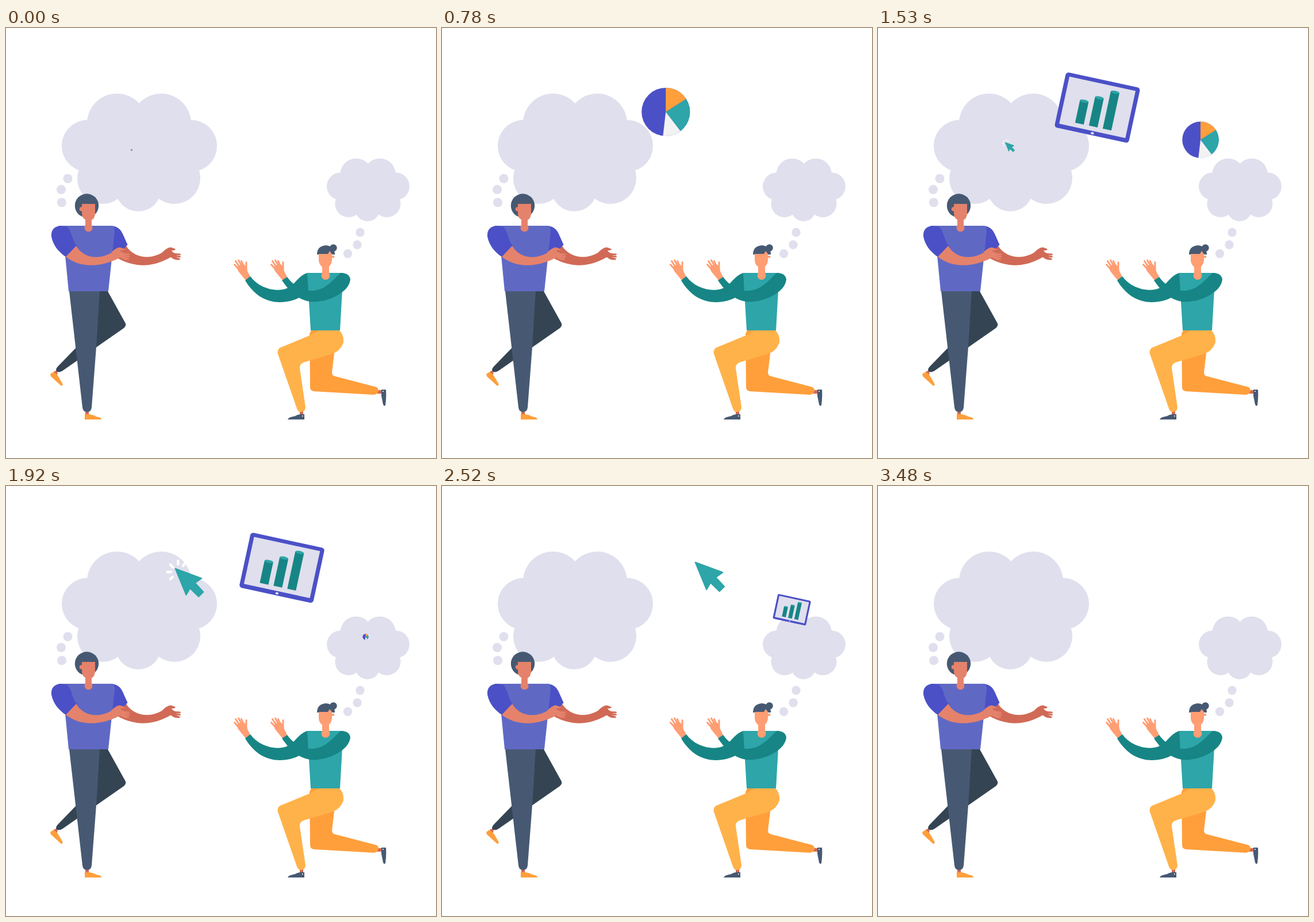
Write an HTML page that moves like this. It is 748 px wide and 748 px high and loops after 3.51 s.

```html
<!DOCTYPE html>
<html lang="en">
<head>
<meta charset="utf-8">
<title>Sharing ideas</title>
<style>
  html, body { margin: 0; width: 100%; height: 100%; overflow: hidden; background: #fff; }
  svg { display: block; width: 100vw; height: 100vh; }
  .cloud { fill: #e0dfed; }
  .blue { fill: #4b50c7; }
  .shirt { fill: #5f69c4; }
  .teal { fill: #2da5a9; }
  .pine { fill: #178585; }
  .slate { fill: #475972; }
  .night { fill: #344453; }
  .orange { fill: #ff9f3b; }
  .amber { fill: #ffb24a; }
  .tan { fill: #e5826b; }
  .rust { fill: #d06a56; }
  .peach { fill: #ff9d73; }
  .white { fill: #fff; }
</style>
</head>
<body>
<svg viewBox="0 0 748 748">
  <defs>
    <g id="cloud">
      <circle cx="142" cy="205" r="45"/><circle cx="322" cy="205" r="45"/>
      <circle cx="193" cy="166" r="52"/><circle cx="270" cy="166" r="52"/>
      <circle cx="168" cy="262" r="44"/><circle cx="293" cy="261" r="45"/>
      <circle cx="230" cy="279" r="40"/><path d="M150 160H310V265H150Z"/>
    </g>
    <path id="palm" d="M272 390Q280 382 286 381.500Q293 383 295 385Q294 387 288 387Q290 391 295 392L303 392.500Q305 394 303 395.300L295 395.500L303 396.500Q305 398 303 399.300L295 398.500L302 400.500Q304 403 301 403.500Q292 404 286 398L276 402Z"/>
    <g id="wave">
      <path d="M417 439L404 423Q401 417 404 413L414 411Q420 417 420 423L425 433Z"/>
      <path d="M405 420L397.500 411.500M407 417L399.500 405.500M410 414L404.500 404M413 414L409.500 405.500M418 418L418 407.500" fill="none" stroke="#ff9d73" stroke-width="3" stroke-linecap="round"/>
    </g>
  </defs>

  <g class="cloud">
    <use href="#cloud"/>
    <use href="#cloud" transform="translate(506.3 166.2) scale(.533)"/>
    <circle cx="107.500" cy="262" r="8"/><circle cx="96" cy="281" r="8"/><circle cx="97" cy="303.500" r="8"/>
    <circle cx="616" cy="355.500" r="7.700"/><circle cx="611" cy="377" r="7.700"/><circle cx="594.500" cy="392.500" r="7.700"/>
  </g>

  <g id="man">
    <path class="rust" d="M84 597L90 596L89 603L82 602ZM138 664H144V675H138Z"/>
    <path class="orange" d="M77 602L83 598Q89 602 92 608L98.500 619Q99 623 95.500 622L78 606ZM137 672Q148 671 157 676Q166 677 166 681H137Z"/>
    <path class="night" d="M150 458H177L207.500 513Q210 518 205 522L98 596.500Q92 600 87.500 597Q86 593 90 589L150 527Z"/>
    <path class="slate" d="M110 458H163L157 555L149 660Q148 668 141 668Q134 668 133 660Z"/>
    <path class="rust" d="M209 379C222 400 252 405 276 388L288 398C256 416 228 418 195 401L190 385Z"/>
    <use href="#palm" class="rust"/>
    <path class="blue" d="M183 344C194 345 199 350 203 358L211.500 377L201 388L185 392Z"/>
    <path class="shirt" d="M92 344H184Q190 345 189 354L178 458H109L103 396Z"/>
    <circle class="slate" cx="140.500" cy="309" r="20.700"/>
    <circle class="tan" cx="131.500" cy="315" r="3.800"/>
    <path class="tan" d="M132 306H155V323Q154 333 148 334V342H138V333Q132 331 132 322Z"/>
    <path class="tan" d="M138 332H149V343A7 7 0 1 1 138 343Z"/>
    <path class="blue" d="M95 344C84 345 78 351 79 363C82 379 93 391 104 398L123 379C115 370 115 355 107 346Z"/>
    <path class="tan" d="M122 379C135 401 163 405 188 388L199 399C165 417 130 418 104 398Z"/>
    <use href="#palm" class="tan" x="-88.500"/>
  </g>

  <g id="woman">
    <path class="rust" d="M645 630H654V636H645ZM511 665H517V675H511Z"/>
    <path class="slate" d="M653 629H661Q662 642 660 656Q658 659 656 655L653 640ZM519 672V681H490Q491 677 503 675Q510 671 519 672Z"/>
    <circle class="white" cx="656" cy="632" r="1"/><circle class="white" cx="516" cy="675" r="1"/>
    <path class="orange" d="M528 532L531 526H571V566L567 599Q567 605 573 606L642 624Q648 625 648 631Q647 637 640 638L536 632Q529 631 529 625Z"/>
    <path class="amber" d="M477 556L528 535L543 526H580Q588 534 587 547Q582 562 567 567L520 581Q510 584 511 592L521 660Q520 668 513 668Q508 668 506 662L473 567Q471 560 477 556Z"/>
    <g class="peach"><use href="#wave"/><use href="#wave" x="64"/></g>
    <path class="pine" d="M425 432C440 453 470 460 488 453C503 447 508 431 524 426L530 462L515 466C508 471 495 477 476 477C454 477 432 466 416 439Z"/>
    <path class="teal" d="M524 426H587L585 455L581 526H530Z"/>
    <path class="pine" d="M582 426Q597 426 599 437C597 462 555 479 529 476C505 472 492 456 480 439L489 433C497 444 510 455 527 457C551 458 562 446 582 426Z"/>
    <path class="slate" d="M541 394Q541 379 557 378Q572 380 572 394Z"/>
    <circle class="slate" cx="569.500" cy="382.500" r="6.200"/>
    <circle class="peach" cx="569" cy="398" r="2.300"/>
    <path class="peach" d="M544 393H560L563 388L567 393V404Q566 416 556 417Q545 416 544 404Z"/>
    <path class="peach" d="M550 412H562V426A7.500 7.500 0 1 1 550 426Z"/>
  </g>

  <g id="pie">
    <circle class="blue" r="42"/>
    <path class="orange" d="M0 0V-42A42 42 0 0 1 35.500 -22.500Z"/>
    <path class="teal" d="M0 0L35.500 -22.500A42 42 0 0 1 25.500 33.400Z"/>
    <path fill="#f2f2f3" d="M0 0L25.500 33.400A42 42 0 0 1 -4.800 41.700Z"/>
  </g>
  <g id="tablet">
    <g transform="rotate(12.2) scale(1.02)">
      <rect class="blue" x="-64.500" y="-48" width="129" height="96" rx="5"/>
      <rect class="cloud" x="-57.500" y="-41.500" width="115" height="82"/>
      <ellipse class="cloud" cx="1" cy="44.300" rx="2.700" ry="2"/>
      <path class="pine" d="M-31.500 -6H-16.500V33H-31.500ZM-7.500 -17H7.500V33H-7.500ZM16.500 -32H31.500V33H16.500Z"/>
      <g class="teal">
        <ellipse cx="-24" cy="-6" rx="7.500" ry="2.500"/><ellipse cy="-17" rx="7.500" ry="2.500"/><ellipse cx="24" cy="-32" rx="7.500" ry="2.500"/>
      </g>
    </g>
  </g>
  <g id="pointer">
    <path class="teal" stroke="#2da5a9" stroke-width="2" stroke-linejoin="round" d="M-17 -17L30.500 0.500L18.500 9L33.500 25L25 33.500L9.500 18.500L2.500 30.500Z"/>
    <path fill="none" stroke="#fff" stroke-width="4.500" stroke-linecap="round" d="M-31 -11H-25M-26 -24L-21 -19M-12 -31V-25M0 -26L-3 -22M-26 2L-22 -2"/>
  </g>
</svg>
<script>
  const LOOP = 3510, SHRINK = 615;
  const track = d => {
    const path = document.createElementNS("http://www.w3.org/2000/svg", "path");
    path.setAttribute("d", d);
    return path;
  };
  const items = [
    { id: "pie", start: -15, span: 2010, d: "M216 215C258 168 316 147 386 146C478 144 585 180 634 278" },
    { id: "tablet", start: 792, span: 2005, d: "M216 215C258 168 316 143 381 138.5C490 131 608 155 636 279" },
    { id: "pointer", start: 1470, span: 1990, d: "M216 215C258 170 316 153 388 148C481 143 608 165 630 278" }
  ].map(item => {
    const path = track(item.d);
    return { ...item, path, length: path.getTotalLength(), node: document.getElementById(item.id) };
  });

  // Damped spring from 0 to 1
  const spring = ms => {
    const decay = .0076, freq = .01412;
    return 1 - Math.exp(-decay * ms) * (Math.cos(freq * ms) + decay / freq * Math.sin(freq * ms));
  };

  function draw(now) {
    const time = now % LOOP;
    for (const { node, start, span, path, length } of items) {
      const age = time - start;
      const visible = age > 0 && age < span;
      node.style.display = visible ? "" : "none";
      if (!visible) continue;
      const { x, y } = path.getPointAtLength(length * age / span);
      const scale = spring(age) * Math.min(1, (span - age) / SHRINK);
      node.setAttribute("transform", `translate(${x} ${y}) scale(${scale})`);
    }
  }

  const origin = performance.now();
  function tick() {
    draw(performance.now() - origin);
    requestAnimationFrame(tick);
  }
  tick();
</script>
</body>
</html>
```
